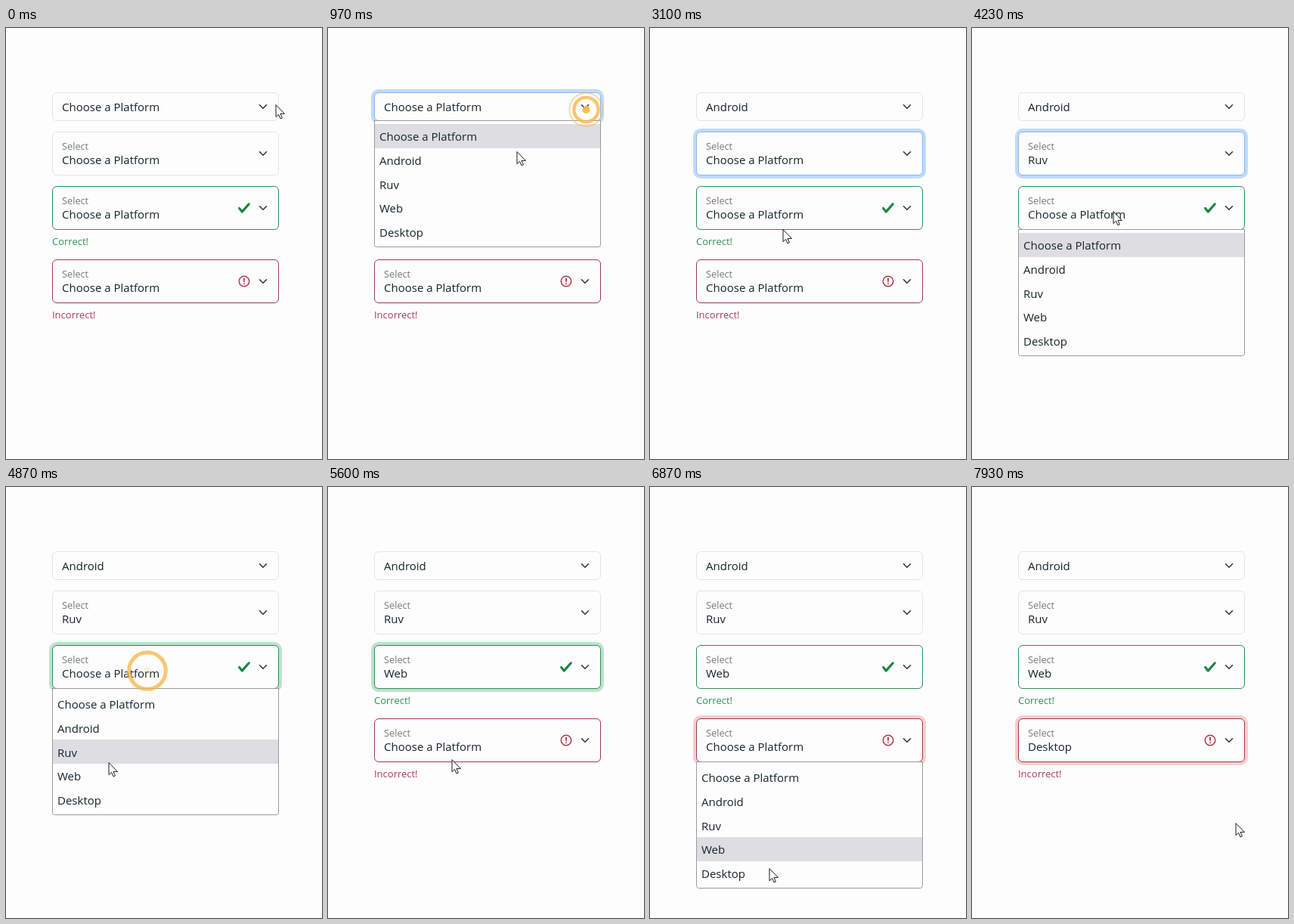
Write an HTML page with a canvas that moves like this. It is 418x570 px and loops after 8730 ms.

```html
<!DOCTYPE html>
<html lang="en">
<head>
<meta charset="utf-8">
<title>Select menus</title>
<style>
  html, body { margin: 0; width: 100%; height: 100%; overflow: hidden; background: #fdfdfd; }
  canvas { display: block; width: 418px; height: 570px; }
</style>
</head>
<body>
<canvas id="stage" width="418" height="570"></canvas>
<script>
const ctx = document.getElementById('stage').getContext('2d');
const LOOP = 8730;
const X = 61, W = 300, ROW = 31.75;
const BG = '#fdfdfd', INK = '#16252b', MUTED = '#74797c';
const FONT = '"Open Sans", "Noto Sans", sans-serif';
const OPTIONS = ['Choose a Platform', 'Android', 'Ruv', 'Web', 'Desktop'];

const PLAIN = { line: '#dfe5e8', focus: '#8ab6f0', ring: [192, 219, 251] };
const VALID = { line: '#2c8f5c', focus: '#2c8f5c', ring: [194, 225, 202],
                note: 'Correct!', noteInk: '#2c9154' };
const INVALID = { line: '#9e3a54', focus: '#9e3a54', ring: [246, 206, 206],
                  note: 'Incorrect!', noteInk: '#a83c54' };

// focus, blur: ring on/off; open, close: popup; set: value update (all in ms)
const selects = [
  { y: 85,  h: 38, look: PLAIN,   pick: 1, open: 500,  close: 1450, set: 1490, focus: 800,  blur: 2450 },
  { y: 137, h: 58, look: PLAIN,   pick: 2, open: 1900, close: 3060, set: 3310, focus: 2450, blur: 4450 },
  { y: 209, h: 58, look: VALID,   pick: 3, open: 4210, close: 5060, set: 5300, focus: 4450, blur: 6270 },
  { y: 306, h: 58, look: INVALID, pick: 4, open: 6280, close: 7240, set: 7480, focus: 6400, blur: 9999 }
];

const clicks = [
  { t: 825,  d: 290, x: 341.5, y: 108 },
  { t: 1440, d: 290, x: 238, y: 173 },
  { t: 2450, d: 330, x: 235, y: 180 },
  { t: 3300, d: 170, x: 175, y: 264 },
  { t: 4620, d: 330, x: 187, y: 243 },
  { t: 5700, d: 330, x: 128, y: 372 },
  { t: 6420, d: 330, x: 229, y: 345 },
  { t: 7600, d: 330, x: 151, y: 520 }
];

// pointer stops: time, x, y
const path = [
  [0, 357, 102], [30, 357, 102], [200, 342, 107], [600, 342, 107],
  [970, 250, 164], [1100, 238, 172], [1870, 238, 172], [2030, 235, 180],
  [2200, 231, 188], [2450, 231, 188], [3020, 176, 267], [3700, 176, 267],
  [3970, 187, 243], [4520, 187, 243], [4870, 136, 365], [5040, 128, 372],
  [5350, 128, 372], [5970, 229, 342], [6420, 229, 342], [6970, 151, 520],
  [7300, 151, 520], [7770, 349, 445], [LOOP, 349, 445]
];

const clamp = (v, lo = 0, hi = 1) => Math.min(hi, Math.max(lo, v));

function pointerAt(t) {
  t = clamp(t, 0, LOOP - 1);
  const i = path.findIndex(p => p[0] > t);
  const [t0, x0, y0] = path[i - 1], [t1, x1, y1] = path[i];
  const u = (t - t0) / (t1 - t0), k = u * u * (3 - 2 * u);
  return { x: Math.round(x0 + (x1 - x0) * k), y: Math.round(y0 + (y1 - y0) * k) };
}

function box(x, y, w, h, r, fill, stroke) {
  ctx.beginPath();
  ctx.roundRect(x, y, w, h, r);
  if (fill) { ctx.fillStyle = fill; ctx.fill(); }
  if (stroke) { ctx.strokeStyle = stroke; ctx.lineWidth = 1; ctx.stroke(); }
}

function text(str, x, y, size, color) {
  ctx.font = `${size}px ${FONT}`;
  ctx.fillStyle = color;
  ctx.fillText(str, x, y);
}

function disc(x, y, r, color) {
  ctx.beginPath();
  ctx.arc(x, y, r, 0, Math.PI * 2);
  ctx.fillStyle = color;
  ctx.fill();
}

function circle(x, y, r, width, color) {
  ctx.beginPath();
  ctx.arc(x, y, r, 0, Math.PI * 2);
  ctx.lineWidth = width;
  ctx.strokeStyle = color;
  ctx.stroke();
}

function chevron(y) {
  ctx.beginPath();
  ctx.moveTo(335.5, y - 2.25);
  ctx.lineTo(340, y + 2.25);
  ctx.lineTo(344.5, y - 2.25);
  ctx.lineWidth = 1.6;
  ctx.lineCap = ctx.lineJoin = 'round';
  ctx.strokeStyle = '#2f3a40';
  ctx.stroke();
}

const tick = new Path2D('M2.3 6.73.6 4.53c-.4-1.04.46-1.4 1.1-.8l1.1 1.4 3.4-3.8c.6-.63 1.6-.27 1.2.7l-4 4.6c-.43.5-.8.4-1.1.1z');

function checkMark(y) {
  ctx.save();
  ctx.translate(306, y - 9);
  ctx.scale(2.25, 2.25);
  ctx.fillStyle = '#198744';
  ctx.fill(tick);
  ctx.restore();
}

function alertMark(y) {
  const red = '#b03a4c';
  circle(315, y, 6.75, 1.5, red);
  ctx.beginPath();
  ctx.moveTo(314.7, y - 3.6);
  ctx.lineTo(315.3, y - 3.6);
  ctx.lineTo(315, y + .75);
  ctx.closePath();
  ctx.stroke();
  disc(315, y + 3.3, .95, red);
}

function drawSelect(s, t) {
  const { y, h, look } = s, mid = y + h / 2;
  const glow = clamp((t - s.focus) / 100) * (1 - clamp((t - s.blur) / 100));
  if (glow > 0) box(X - 4, y - 4, W + 8, h + 8, 10, `rgba(${look.ring},${glow})`);
  box(X + .5, y + .5, W - 1, h - 1, 5.5, BG, glow > .5 ? look.focus : look.line);

  const floating = h > 40;
  if (floating) text('Select', 74, y + 24, 12.75, MUTED);
  text(OPTIONS[t >= s.set ? s.pick : 0], 74, y + (floating ? 43 : 25), 15, INK);
  if (look === VALID) checkMark(mid);
  if (look === INVALID) alertMark(mid);
  chevron(mid);
  if (look.note) text(look.note, X, y + h + 20, 13, look.noteInk);
}

function drawPopup(s, t) {
  if (t < s.open || t >= s.close) return;
  const base = s.y + s.h, top = base + 4;
  // the highlight trails the pointer slightly
  const active = clamp(Math.floor((pointerAt(t - 90).y - top) / ROW), 0, OPTIONS.length - 1);
  box(X + .5, base - .5, W - 1, 167, [0, 0, 3, 3], BG, '#959b9b');
  ctx.fillStyle = '#dddde2';
  ctx.fillRect(X + 1, Math.floor(top + active * ROW), W - 2, 32);
  OPTIONS.forEach((name, i) => text(name, 68, Math.round(base + 26 + i * ROW), 15, INK));
}

function drawClick(c, t) {
  const p = (t - c.t) / c.d;
  if (p <= 0 || p >= 1) return;
  const amber = a => `rgba(248,184,76,${clamp(a)})`;
  circle(c.x, c.y, 32 * p, 3 + 2.7 * p, amber(Math.min(.8, (1 - p) * 3.2)));
  if (p < .72) circle(c.x, c.y, 44 * p, 1.6, amber(1.5 - p * 1.8));
  disc(c.x, c.y, 5, amber((.82 - p) * 3));
}

const arrow = new Path2D('M.5 .5V16.2L4.1 12.8L6.5 18.4L8.9 17.4L6.5 11.9H11.6Z');

function drawPointer(t) {
  const p = pointerAt(t);
  ctx.save();
  ctx.translate(p.x - .5, p.y - .5);
  ctx.fillStyle = '#fdfdfd';
  ctx.fill(arrow);
  ctx.lineWidth = 1;
  ctx.lineJoin = 'miter';
  ctx.strokeStyle = '#1a1c1e';
  ctx.stroke(arrow);
  ctx.restore();
}

const start = performance.now();

function draw() {
  const t = (performance.now() - start) % LOOP;
  ctx.fillStyle = BG;
  ctx.fillRect(0, 0, 418, 570);
  selects.forEach(s => drawSelect(s, t));
  selects.forEach(s => drawPopup(s, t));
  clicks.forEach(c => drawClick(c, t));
  drawPointer(t);
  requestAnimationFrame(draw);
}
draw();
</script>
</body>
</html>
```
